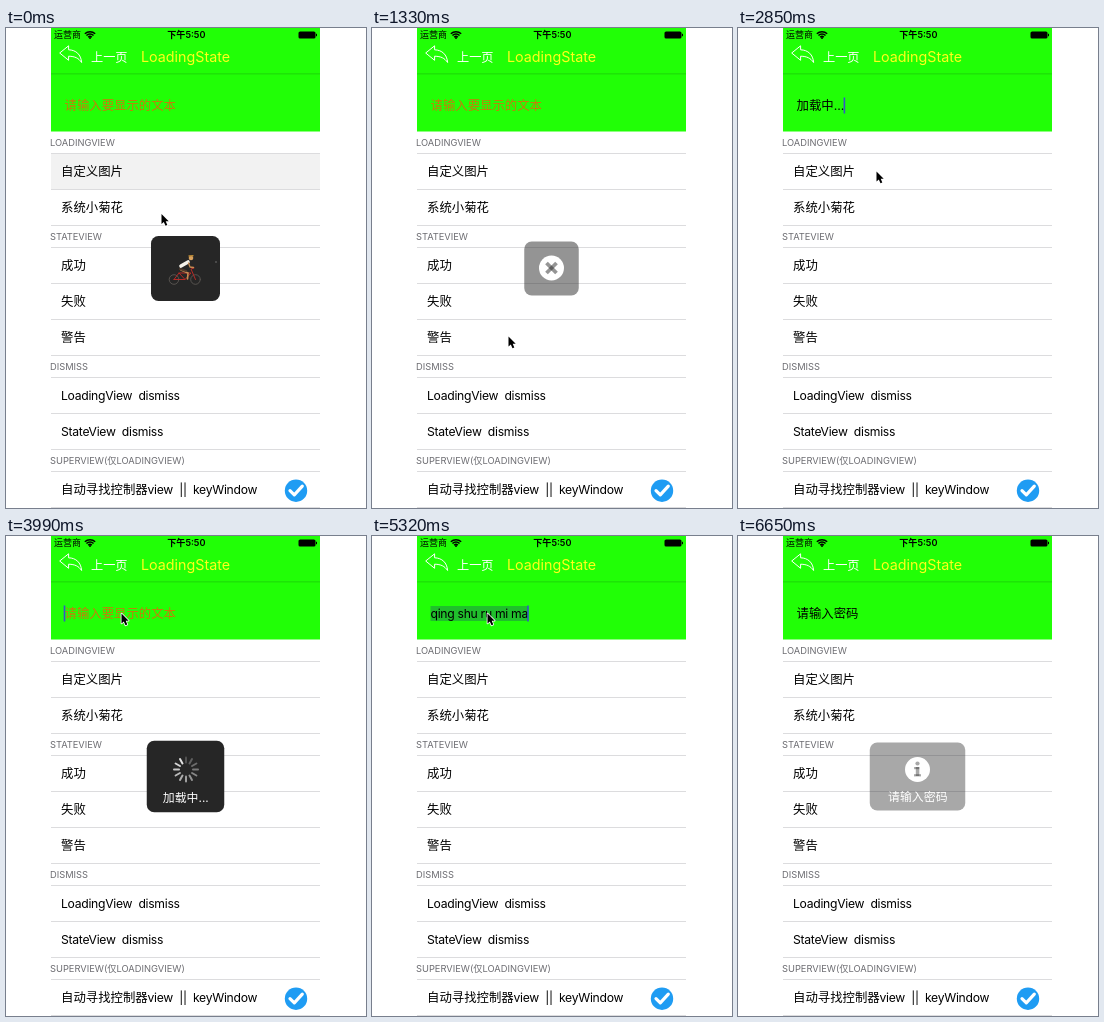
Recreate the animation shown at these times as an HTML page with a canvas. Size 360 by 480 pixels, loop 6.84 s.

```html
<!DOCTYPE html>
<html lang="zh-CN">
<head>
<meta charset="utf-8">
<style>
html, body { margin: 0; width: 100%; height: 100%; overflow: hidden; background: #fff; }
canvas { display: block; width: 360px; height: 480px; }
</style>
</head>
<body>
<canvas id="stage"></canvas>
<script>
const STEP = 190, STEPS = 36;
const canvas = document.getElementById('stage');
const ctx = canvas.getContext('2d');
const ratio = window.devicePixelRatio || 1;
canvas.width = 360 * ratio;
canvas.height = 480 * ratio;

const FAMILY = 'Inter, "Noto Sans CJK SC", "Noto Sans CJK", sans-serif';
const GREEN = '#21ff06', DARK = '#262626', LINE = '#dcdcde';

function text(str, x, y, { size = 12.4, color = '#000', align = 'left', weight = 400, track = 0 } = {}) {
  ctx.font = `${weight} ${size}px ${FAMILY}`;
  ctx.letterSpacing = track + 'px';
  ctx.fillStyle = color;
  ctx.textAlign = align;
  ctx.textBaseline = 'alphabetic';
  ctx.fillText(str, x, y);
  return ctx.measureText(str).width;
}

function rect(x, y, w, h, color) {
  ctx.fillStyle = color;
  ctx.fillRect(x, y, w, h);
}

function round(x, y, w, h, r, color) {
  ctx.beginPath();
  ctx.roundRect(x, y, w, h, r);
  ctx.fillStyle = color;
  ctx.fill();
}

function disc(x, y, r, color) {
  ctx.beginPath();
  ctx.arc(x, y, r, 0, Math.PI * 2);
  ctx.fillStyle = color;
  ctx.fill();
}

function path(points, color, width, close = false) {
  ctx.beginPath();
  points.forEach(([x, y], i) => i ? ctx.lineTo(x, y) : ctx.moveTo(x, y));
  if (close) ctx.closePath();
  ctx.strokeStyle = color;
  ctx.lineWidth = width;
  ctx.stroke();
}

const LATIN = { size: 12.2, track: -0.3 };

const headers = [
  ['LOADINGVIEW', 118], ['STATEVIEW', 212], ['DISMISS', 342], ['SUPERVIEW(仅LOADINGVIEW)', 436]
];
const rows = [
  ['自定义图片', 125], ['系统小菊花', 161], ['成功', 219], ['失败', 255], ['警告', 291],
  ['LoadingView  dismiss', 349, LATIN], ['StateView  dismiss', 385, LATIN], ['自动寻找控制器', 443]
];
const lines = new Set(rows.flatMap(([, y]) => [y, y + 36]));

// [first step, last step, row index]
const highlights = [[0, 0, 0], [1, 2, 1], [4, 4, 2], [6, 6, 3], [8, 9, 4], [16, 16, 0], [18, 18, 1]];

// [step, x, y] of the pointer tip
const pointer = [
  [0, 155.5, 186], [2, 150, 184], [4, 138, 239], [5, 137, 250], [6, 136.5, 276], [7, 136.5, 308.5],
  [9, 136.5, 310], [12, 116, 80], [13, 116, 80], [15, 138.5, 143.5], [17, 139, 145], [18, 141, 179],
  [19, 140, 178], [21, 115.5, 77.5], [28, 115.5, 77.5], [31, 106, 273], [32, 106.5, 275], [33, 107, 308], [34, 107, 311]
];

// [first step, last step, kind, label, opacity at the last step]
const huds = [
  [0, 1, 'rider', '', 1], [2, 3, 'spinner', '', 1], [4, 5, 'check', '', .6], [6, 7, 'cross', '', .49],
  [8, 10, 'info', '', .4], [16, 17, 'rider', '加载中...', 1], [18, 22, 'spinner', '加载中...', 1],
  [32, 33, 'cross', '请输入密码', .45], [34, 35, 'info', '请输入密码', .4]
];

// [first step, field text, being composed, caret shown]
const typing = [
  [0, '', false, false], [12, '', false, true], [13, 'jia zai', true, true], [14, '加载中...', false, true],
  [16, '加载中...', false, false], [20, '', false, true], [24, 'q', true, true], [25, 'qing', true, true],
  [26, 'qing shu', true, true], [27, 'qing shu ru', true, true], [28, 'qing shu ru mi ma', true, true],
  [29, '请输入密码', false, true], [30, '请输入密码', false, false]
];

function statusBar() {
  text('运营商', 48, 10.3, { size: 9 });
  ctx.lineCap = 'butt';
  for (const r of [2.6, 5, 7.3]) {
    ctx.beginPath();
    ctx.arc(84, 11, r, -Math.PI * .75, -Math.PI * .25);
    ctx.strokeStyle = '#000';
    ctx.lineWidth = 1.5;
    ctx.stroke();
  }
  disc(84, 10, 1, '#000');
  text('下午5:50', 180.3, 10.3, { size: 9.1, weight: 600, align: 'center' });
  round(292.5, 3.5, 17, 7, 1.6, '#000');
  rect(310, 5.8, 1, 2.4, '#000');
}

function navBar() {
  ctx.beginPath();
  ctx.moveTo(53.7, 25);
  ctx.lineTo(62.6, 17.8);
  ctx.lineTo(62.6, 21.8);
  ctx.bezierCurveTo(70, 22, 75, 26.5, 75.6, 34.5);
  ctx.bezierCurveTo(72.5, 30, 69, 28.4, 62.6, 28.2);
  ctx.lineTo(62.6, 32.3);
  ctx.closePath();
  ctx.lineJoin = 'round';
  ctx.strokeStyle = '#fff';
  ctx.lineWidth = 1;
  ctx.stroke();
  text('上一页', 85, 34.2, { size: 12.2, weight: 300, color: '#fff' });
  text('LoadingState', 135, 34.4, { size: 14.3, color: '#ffff1a' });
  rect(45, 45.5, 269, .8, '#1bcc08');
}

function field(step) {
  const [, value, composing, caret] = typing.filter(s => s[0] <= step).pop();
  const x = 58.5, y = 82;
  const style = /[a-z]/.test(value) ? LATIN : {};
  let width = 0;
  if (value) {
    if (composing) {
      ctx.font = `400 ${LATIN.size}px ${FAMILY}`;
      ctx.letterSpacing = LATIN.track + 'px';
      rect(x, 70, ctx.measureText(value).width, 15, '#20bf2c');
    }
    width = text(value, x, y, style);
  } else {
    text('请输入要显示的文本', x, y, { color: '#c97b0b' });
  }
  if (caret) rect(x + width - .8, 69.5, 1.6, 16, '#3456c8');
}

function table(step) {
  for (const [from, to, index] of highlights) {
    if (step >= from && step <= to) rect(45, rows[index][1], 269, 36, step ? '#e2e2e2' : '#f2f2f2');
  }
  for (const [label, y] of headers) text(label, 44, y, { size: 9.3, color: '#6d6d72' });
  for (const y of lines) rect(45, y, 269, 1, LINE);
  for (const [label, y, style] of rows) text(label, 55, y + 22.7, style);
  text('view  ||  keyWindow', 141.5, 465.5, LATIN);
  disc(290, 462.7, 11.2, '#1f9cf3');
  ctx.lineCap = ctx.lineJoin = 'round';
  path([[284, 462.6], [288.3, 466.8], [296.3, 458.2]], '#fff', 3.2);
}

function spinner(x, y, time) {
  const head = Math.floor(time * 12 / 1000) % 12;
  ctx.lineCap = 'round';
  for (let i = 0; i < 12; i++) {
    const angle = i * Math.PI / 6 - Math.PI / 2;
    const light = 225 - 13 * ((head - i + 12) % 12);
    const at = r => [x + r * Math.cos(angle), y + r * Math.sin(angle)];
    path([at(7), at(12)], `rgb(${light},${light},${light})`, 2);
  }
}

function rider(x, y, step) {
  const red = '#b52a26', skin = '#c98c52';
  const turn = step * 1.4;
  ctx.save();
  ctx.translate(x, y);
  ctx.lineCap = ctx.lineJoin = 'round';
  for (const wheel of [-11, 10.5]) {
    ctx.beginPath();
    ctx.arc(wheel, 9.5, 4.8, 0, Math.PI * 2);
    ctx.strokeStyle = '#625d59';
    ctx.lineWidth = .8;
    ctx.stroke();
  }
  path([[-11, 9.5], [-6, 3], [6, 3], [0, 9.5], [-11, 9.5]], red, 1);
  path([[-6, 3], [0, 9.5]], red, 1);
  path([[10.5, 9.5], [6, -1], [9, -2]], red, 1);
  path([[-4, 0], [3, 3], [Math.cos(turn) * 2.5, 9 + Math.sin(turn) * 2.5]], skin, 1.6);
  path([[-5, -1], [1, 1]], '#4f3a2c', 2);
  path([[-4, -4], [3, -8]], '#f4f1ea', 3.6);
  path([[3.5, -7], [5, -3], [8.5, -2.5]], skin, 1.3);
  disc(6, -12, 2.3, '#d8a15f');
  path([[4, -14], [8, -14.3]], '#b98a36', 1.3);
  ctx.restore();
}

function badge(kind, x, y) {
  ctx.lineCap = 'butt';
  ctx.lineJoin = 'miter';
  if (kind === 'cross') {
    path([[x - 5, y - 5], [x + 5, y + 5]], DARK, 3.8);
    path([[x + 5, y - 5], [x - 5, y + 5]], DARK, 3.8);
  } else if (kind === 'check') {
    path([[x - 6.5, y], [x - 2, y + 4.5], [x + 6.5, y - 4]], DARK, 3.6);
  } else {
    disc(x, y - 6, 2.1, DARK);
    rect(x - 3.4, y - 2.5, 5.2, 2.2, DARK);
    rect(x - 1.7, y - 2.5, 3.5, 9, DARK);
    rect(x - 3.5, y + 4.7, 7, 2.2, DARK);
  }
}

function hudSize(kind, label) {
  if (!label) return kind === 'rider' ? [69, 65] : [54.5, 54];
  const height = { rider: 84, spinner: 71.5 }[kind] || 68;
  return [label.length === 5 ? 95.5 : 77.5, height];
}

function hud(step, time) {
  const item = huds.find(h => step >= h[0] && step <= h[1]);
  if (!item) return;
  const [, last, kind, label, fade] = item;
  const [w, h] = hudSize(kind, label);
  const cx = 179.5, cy = label ? 233.5 : 240;
  const opacity = step === last ? fade : 1;

  ctx.save();
  ctx.globalAlpha = opacity;
  round(cx - w / 2, 240.5 - h / 2, w, h, 7.5, DARK);
  ctx.globalAlpha = 1;
  if (kind === 'rider') {
    rider(179, label ? 229 : 242, step);
    disc(210, 234, .8, '#777');
  } else if (kind === 'spinner') {
    spinner(180, cy, time);
  } else {
    disc(cx, cy, 12.5, '#fff');
    ctx.globalAlpha = opacity;
    badge(kind, cx, cy);
    ctx.globalAlpha = 1;
  }
  if (label) {
    const y = { rider: 274, spinner: 266 }[kind] || 264.5;
    text(label, cx + .3, y, { size: 11.9, color: '#fff', align: 'center' });
  }
  ctx.restore();
}

function inputMenu(step) {
  if (step < 23 || step > 25) return;
  ctx.save();
  ctx.shadowColor = 'rgba(0,0,0,.4)';
  ctx.shadowBlur = 3 * ratio;
  round(126, 168.5, 108, 143.5, 6, '#fff');
  ctx.restore();
  round(126, 168.5, 108, 36.5, [6, 6, 0, 0], '#0b63f6');
  ['简体拼音', '简体手写', 'English (US)', 'Emoji'].forEach((name, i) => {
    text(name, 180, 191.7 + 36 * i, {
      size: 13.1, align: 'center', track: i > 1 ? -.3 : 0, color: i ? '#000' : '#fff'
    });
    if (i > 1) rect(126, 168.5 + 36 * i, 108, .8, '#dedede');
  });
  ctx.beginPath();
  ctx.roundRect(126, 168.5, 108, 143.5, 6);
  ctx.strokeStyle = '#999';
  ctx.lineWidth = .8;
  ctx.stroke();
}

function drawPointer(step) {
  const next = pointer.findIndex(p => p[0] >= step);
  if (next < 0) return;
  const b = pointer[next], a = pointer[Math.max(0, next - 1)];
  const part = b[0] === a[0] ? 0 : (step - a[0]) / (b[0] - a[0]);
  const x = a[1] + (b[1] - a[1]) * part, y = a[2] + (b[2] - a[2]) * part;
  const shape = [[0, 0], [0, 10], [2.3, 8], [4, 11.8], [5.8, 11], [4.2, 7.3], [7.2, 7.2]];
  ctx.save();
  ctx.translate(x, y);
  ctx.lineJoin = 'round';
  path(shape, '#fff', 1.6, true);
  ctx.fillStyle = '#000';
  ctx.fill();
  ctx.restore();
}

function draw(now) {
  const step = Math.floor(now / STEP) % STEPS;
  ctx.setTransform(ratio, 0, 0, ratio, 0, 0);
  rect(0, 0, 360, 480, '#fff');
  rect(45, 0, 269, 103.5, GREEN);
  statusBar();
  navBar();
  field(step);
  table(step);
  hud(step, step * STEP);
  inputMenu(step);
  drawPointer(step);
}

const start = performance.now();
function tick() {
  draw(performance.now() - start);
  requestAnimationFrame(tick);
}
tick();
</script>
</body>
</html>
```
